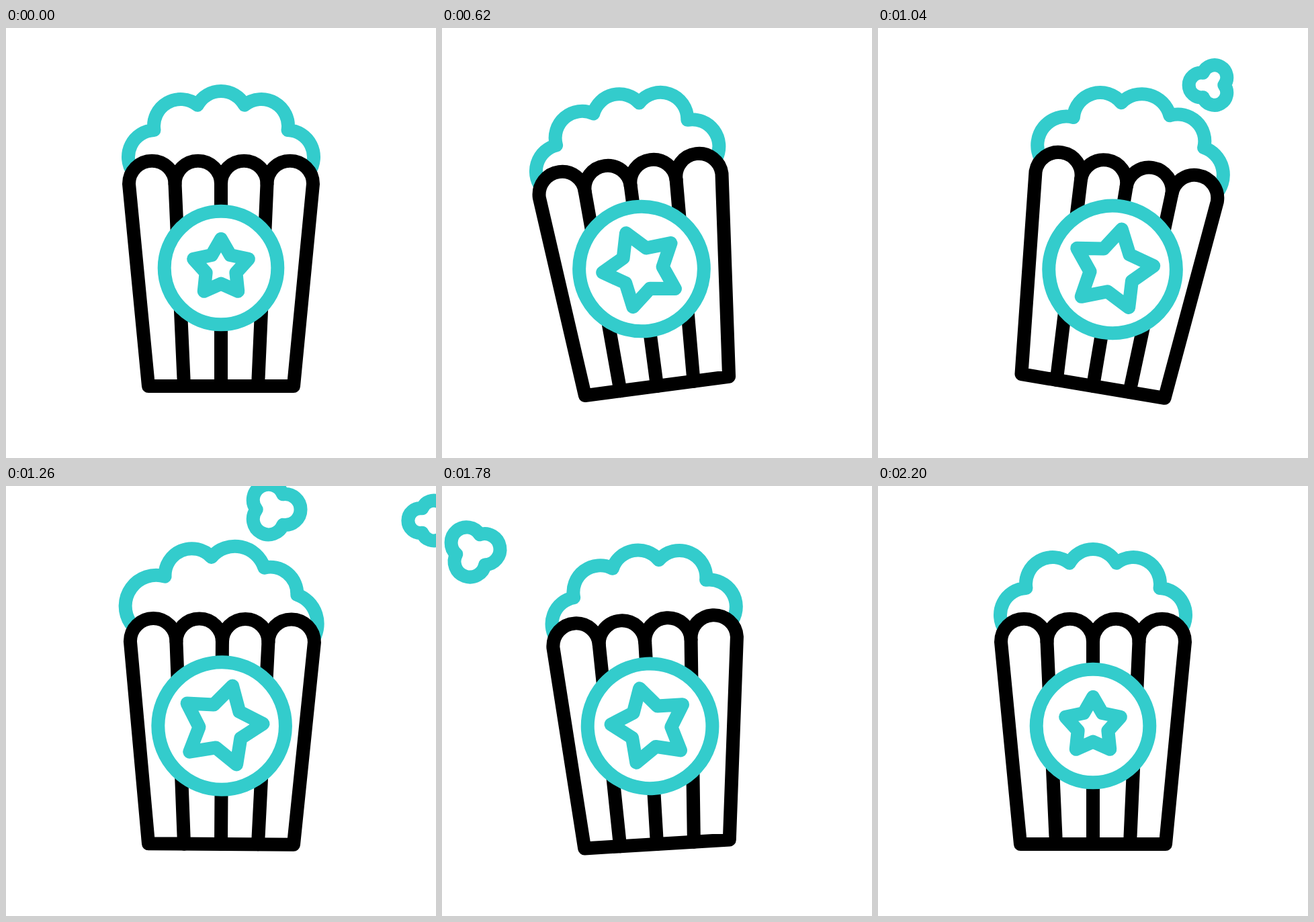
These frames come from a looping animation (640 px wide and 640 px high, 2400 ms). An HTML page:

```html
<!DOCTYPE html>
<html lang="en">
<head>
<meta charset="utf-8">
<title>Popcorn</title>
<style>
  html, body { margin: 0; width: 100%; height: 100%; overflow: hidden; background: #fff; }
  svg { display: block; width: 100vw; height: 100vh; }
  path, circle { fill: #fff; stroke: #3cc; stroke-width: 20; stroke-linejoin: round; stroke-linecap: round; vector-effect: non-scaling-stroke; }
  .black { stroke: #000; }
</style>
</head>
<body>
<svg viewBox="0 0 640 640">
  <g id="pieces"></g>
  <g id="bucket">
    <path id="cloud"/>
    <path class="black" d="M212 533L183 232a34.25 34.25 0 0 1 68.5 0a34.25 34.25 0 0 1 68.5 0a34.25 34.25 0 0 1 68.5 0a34.25 34.25 0 0 1 68.5 0L428 533Z"/>
    <path class="black" d="M251.5 232L265 533M320 232V533M388.5 232L375 533"/>
    <circle id="badge" cx="320" cy="357"/>
    <path id="star"/>
  </g>
</svg>
<script>
const LOOP = 2400, STEP = 20, BEGIN = 200, END = 2200;
const $ = id => document.getElementById(id);
const polar = (r, deg, x = 0, y = 0) => {
  const a = deg * Math.PI / 180;
  return [x + r * Math.cos(a), y + r * Math.sin(a)];
};
const fmt = p => p.map(n => n.toFixed(2)).join(' ');
const arc = (r, big, p) => `A${r} ${r} 0 ${big} 1 ${fmt(p)}`;

const smooth = f => {
  f = Math.min(1, Math.max(0, f));
  return f * f * (3 - 2 * f);
};

// Adds up eased moves from rest; each move is [start, end, change].
const sum = (t, moves) =>
  moves.reduce((v, [a, b, change]) => v + change * smooth((t - a) / (b - a)), 0);

// Swings left, right, left and back to rest.
const swing = (t, left, right, leftAgain) => sum(t, [
  [BEGIN, 750, -left], [750, 1230, left + right],
  [1230, 1700, -right - leftAgain], [1700, END, leftAgain]
]);
const tilt = t => sum(t, [[BEGIN, 580, -8], [580, 980, 17.5], [1070, 1460, -19], [1455, 2000, 9.5]]);
const swell = t => smooth((t - BEGIN) / 580) * smooth((END - t) / 580);

// Outer crossing point of two neighbouring lobes.
function meet([x0, y0, r0], [x1, y1, r1]) {
  const dx = x1 - x0, dy = y1 - y0, d = Math.hypot(dx, dy);
  const a = (d * d + r0 * r0 - r1 * r1) / (2 * d);
  const h = Math.sqrt(Math.max(0, r0 * r0 - a * a));
  return [x0 + (a * dx + h * dy) / d, y0 + (a * dy - h * dx) / d];
}

// Five mirrored lobes roll around the cloud's middle, the outer ones less.
function cloudPath(lean) {
  const c = [-2, -1, 0, 1, 2].map(i => {
    const n = Math.abs(i), u = i / 2;
    const x = Math.sign(i) * (22 + 38 * n) * (n ? 1 : 0);
    const y = 134 + 5 * n + 12 * n * n - 180 - (n === 1 ? 5 : 0);
    return [x, y, n, u];
  }).map(([x, y, n, u]) => {
    const turn = lean * (1 - u * u / 2);
    const [cos, sin] = polar(1, turn);
    return [
      320 + x * cos - y * sin + .03 * lean * lean * (1 - u * u),
      180 + x * sin + y * cos,
      40 + (n % 2 ? 0 : .4 * Math.max(0, lean))
    ];
  });
  const [x, y, r] = c[0], [ex, ey, er] = c[4];
  const ends = c.slice(1).map((l, i) => meet(c[i], l));
  ends.push(polar(er, 35, ex, ey));
  return 'M' + fmt(polar(r, 145, x, y)) + c.map((l, i) => arc(l[2], 0, ends[i])).join('');
}

function starPath(R) {
  const pts = Array.from({ length: 10 }, (_, i) =>
    fmt(polar(i % 2 ? R * .547 : R, i * 36 - 90, 320, 357)));
  return 'M' + pts.join('L') + 'Z';
}

function trefoilPath() {
  const c = [0, 120, 240].map(a => [...polar(16.5, a), 23]);
  return 'M' + fmt(meet(c[2], c[0])) + c.map((l, i) => arc(23, 1, meet(l, c[(i + 1) % 3]))).join('') + 'Z';
}

// Pieces fly from one spot in the cloud under the same gravity.
const GRAVITY = .0004, LIFE = 700;
function throwPiece(at, vx, vy, turn, size) {
  const el = document.createElementNS('http://www.w3.org/2000/svg', 'path');
  el.setAttribute('d', trefoilPath());
  $('pieces').append(el);
  return t => {
    const dt = t - at;
    const x = 340 + vx * dt, y = 170 + vy * dt + GRAVITY * dt * dt;
    el.style.display = dt >= 0 && dt < LIFE ? '' : 'none';
    el.setAttribute('transform', `translate(${x} ${y}) rotate(${turn}) scale(${size})`);
  };
}
const pieces = [
  throwPiece(790, .617, -.44, 180, .8),
  throwPiece(1000, .227, -.623, 0, 1),
  throwPiece(1300, -.61, -.344, -10, 1)
];

function draw(t) {
  const s = swell(t);
  $('bucket').setAttribute('transform', `rotate(${tilt(t)} 320 533)`);
  $('cloud').setAttribute('d', cloudPath(swing(t, 8, 15, 9)));
  $('badge').setAttribute('r', 84.3 + 10.5 * s);
  $('star').setAttribute('d', starPath(43 + 18.5 * s));
  $('star').setAttribute('transform', `rotate(${swing(t, 18.5, 15, 13)} 320 357)`);
  pieces.forEach(move => move(t));
}

const start = performance.now();
function tick() {
  const t = (performance.now() - start) % LOOP;
  draw(Math.floor(t / STEP) * STEP);
  requestAnimationFrame(tick);
}
tick();
</script>
</body>
</html>
```
